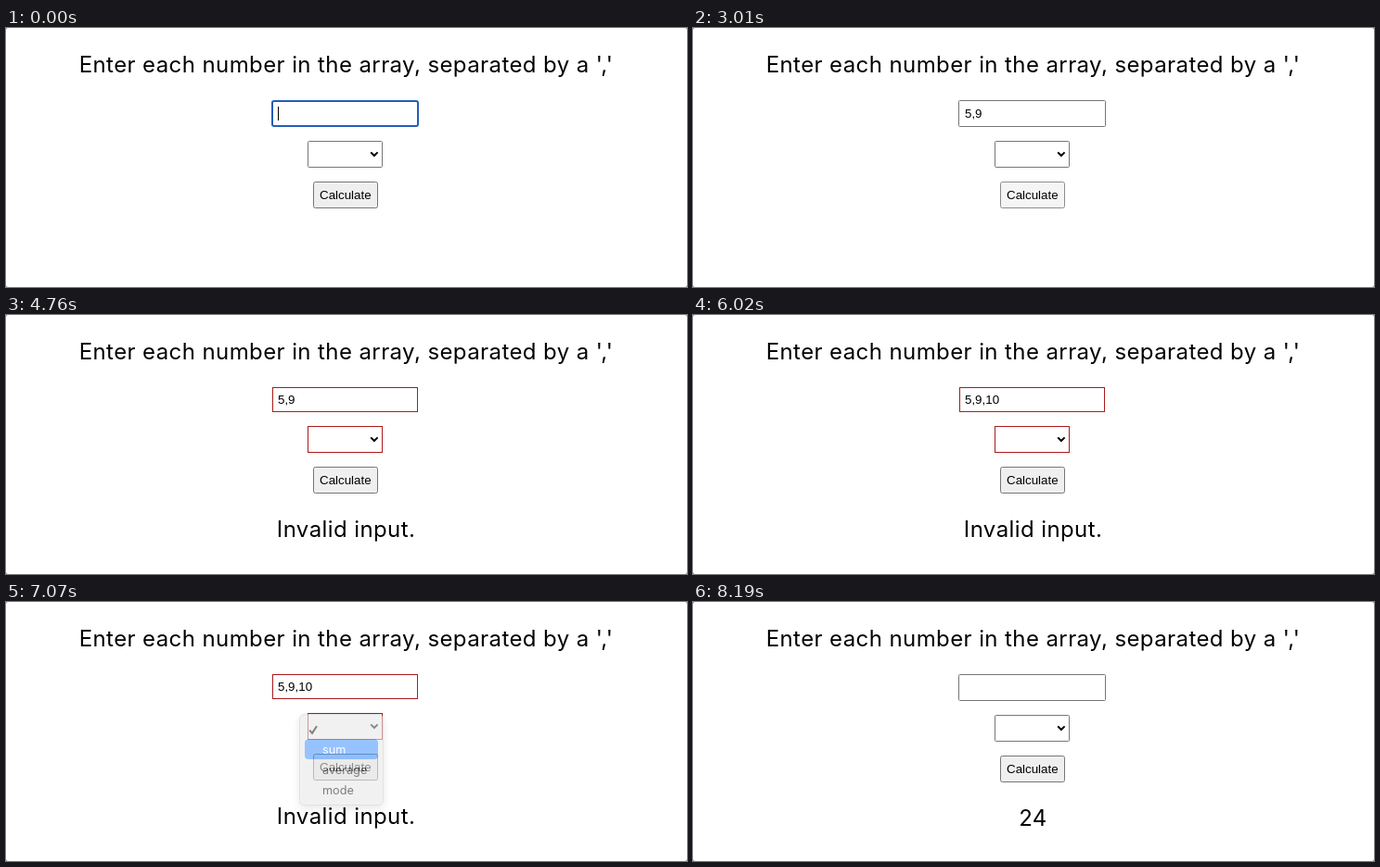
An HTML page that plays this animation: 734x280 px, repeating every 8.33 s.

```html
<!DOCTYPE html>
<html lang="en">
<head>
<meta charset="utf-8">
<title>Array calculator</title>
<style>
  html, body { margin: 0; width: 100%; height: 100%; overflow: hidden; background: #777; }
  svg { display: block; width: 734px; height: 280px; background: #fff; border-radius: 2px; }
  text { white-space: pre; }
  .big { font: 24px Inter, sans-serif; letter-spacing: .4px; text-anchor: middle; }
  .form { font: 13.333px "Liberation Sans", Arial, sans-serif; }
  #popup { font: 12.7px Inter, sans-serif; fill: #2b2b2b; }
  #panel { filter: drop-shadow(0 3px 4px rgba(0, 0, 0, .16)); }
  .line { fill: none; stroke-width: 2; }
</style>
</head>
<body>
<svg viewBox="0 0 734 280">
  <text class="big" x="366.5" y="48">Enter each number in the array, separated by a ','</text>

  <rect id="field" fill="#fff"/>
  <g id="entry">
    <text id="typed" class="form" x="293" y="97"></text>
    <rect id="caret" y="85" width="1" height="15"/>
  </g>

  <g id="controls">
    <rect id="select" x="325.5" y="122.5" width="80" height="28" fill="#fff"/>
    <text id="choice" class="form" x="330" y="141"></text>
    <path class="line" stroke="#000" d="M393.2 134.4l3.7 3.6 3.7-3.6"/>
    <rect id="button" x="331.5" y="166.5" width="69" height="28" rx="2"/>
    <text class="form" x="338" y="185">Calculate</text>
  </g>

  <text id="result" class="big" x="366.5"></text>

  <g id="popup">
    <rect id="panel" x="316.5" y="121.5" width="90" height="98" rx="5" fill="#e8e8e8" stroke="#cfcfcf"/>
    <rect id="highlight" x="322" width="79" height="21.5" rx="4" fill="#529cff"/>
    <path id="check" class="line" d="M327.2 138.6l2.8 3.2 5-7.6" stroke-width="1.8"/>
    <text id="sum" x="341" y="164">sum</text>
    <text x="341" y="186">average</text>
    <text x="341" y="208">mode</text>
  </g>
</svg>
<script>
const LOOP = 8330, TICK = 70;
const INVALID = 3150, SOLVED = 7630;
const KEYS = [[840, '5'], [1050, ','], [1400, '9'], [5040, ','], [5250, '1'], [5320, '0']];
const CARET_ON = [[0, 140], [700, 1960], [2520, 3010], [4200, 4760], [5040, 5810]];
const BUTTON = {
  idle: { fill: '#efefef', stroke: '#767676' },
  hover: { fill: '#e5e5e5', stroke: '#4f4f4f' },
  active: { fill: '#f5f5f5', stroke: '#8d8d8d' }
};
const FIELD = {
  focus: { x: 287, y: 79, width: 157, height: 27, rx: 2, stroke: '#245cb8', 'stroke-width': 2 },
  plain: { x: 286.5, y: 78.5, width: 158, height: 28, rx: 1, stroke: '#767676', 'stroke-width': 1 },
  error: { x: 287.5, y: 78.5, width: 156, height: 26, rx: 0, stroke: '#ab1a1a', 'stroke-width': 1 }
};

const el = id => document.getElementById(id);
const set = (id, attrs) => {
  for (const name in attrs) el(id).setAttribute(name, attrs[name]);
};
const show = (id, visible) => set(id, { visibility: visible ? 'visible' : 'hidden' });

function drawForm(t) {
  const error = t >= INVALID && t < SOLVED;
  const lift = `translate(0 ${error ? -2 : 0})`;
  set('field', FIELD[error ? 'error' : t < 3010 ? 'focus' : 'plain']);
  set('entry', { transform: `translate(0 ${error ? -1 : 0})` });
  set('controls', { transform: lift });
  set('select', { stroke: error ? '#ab1a1a' : '#767676', rx: error ? 0 : 1 });

  const typed = el('typed');
  typed.textContent = t < SOLVED ? KEYS.filter(k => t >= k[0]).map(k => k[1]).join('') : '';
  const end = typed.textContent ? typed.getComputedTextLength() : 0;
  set('caret', { x: Math.floor(293 + end) });
  show('caret', CARET_ON.some(([from, to]) => t >= from && t < to));

  const pressed = t >= 3010 && t < INVALID;
  const hovered = (t >= 2870 && t < 3920) || (t >= 7560 && t < 8190);
  set('button', BUTTON[pressed ? 'active' : hovered ? 'hover' : 'idle']);

  el('choice').textContent = t >= 7140 && t < SOLVED ? 'sum' : '';
  el('result').textContent = t >= SOLVED ? '24' : error ? 'Invalid input.' : '';
  set('result', { y: error ? 240 : 242 });
}

function drawPopup(t) {
  const onSum = t >= 6440;
  const lit = t < 6860 || t >= 6930; // the chosen row blinks once
  const fade = Math.min(1, Math.max(0, (7210 - t) / 233));
  show('popup', t >= 6230 && fade > 0);
  set('popup', { opacity: fade });
  set('highlight', { y: onSum ? 148.5 : 127, opacity: lit ? 1 : 0 });
  set('check', { stroke: onSum ? '#2b2b2b' : '#fff' });
  set('sum', { fill: onSum && lit ? '#fff' : '#2b2b2b' });
}

function frame() {
  const t = Math.floor(performance.now() % LOOP / TICK) * TICK;
  drawForm(t);
  drawPopup(t);
  requestAnimationFrame(frame);
}
frame();
</script>
</body>
</html>
```
